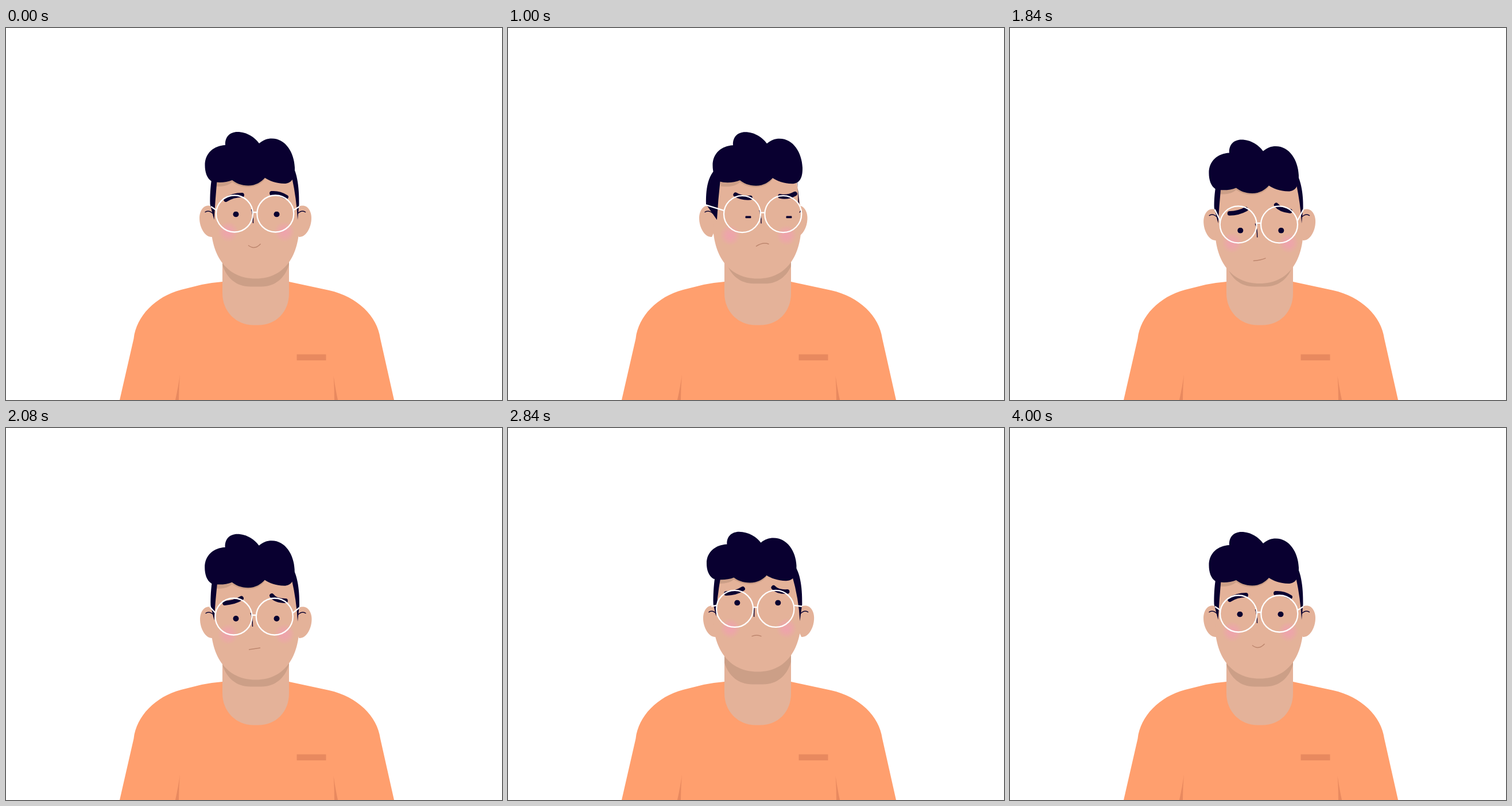
Animation, 864 px wide and 648 px high, one loop 4040 ms. Source, as an HTML page with a canvas:

```html
<!DOCTYPE html>
<html lang="en">
<head>
<meta charset="utf-8">
<title>Portrait</title>
<style>
  html, body { margin: 0; width: 100%; height: 100%; overflow: hidden; background: #fff; }
  canvas { display: block; }
</style>
</head>
<body>
<canvas id="stage" width="864" height="648"></canvas>
<script>
const ctx = document.getElementById('stage').getContext('2d');
const LOOP = 4040, STEP = 40;
const SKIN = '#e4b299', SHADE = '#cc9f87', INK = '#090030', SHIRT = '#ff9f6e', FOLD = '#e8895f';
const LENS = 32, GAP = 71.3, EYE_GAP = 71;

/* hair: x, y, height | ear: left x, right x, y, line lengths | lock: outer x, inner x, inner y, tip
   glasses: lens x, y, arm ends | eyes: x, y, opening | nose and mouth: start, then offsets */
const neutral = {
  hair: [0, 0, 1], jaw: [0], shade: [0, 0], cheek: [355],
  ear: [0, 0, 0, 14, 14],
  lockL: [355.5, 367.5, 266, 362.5, 334], lockR: [510.5, 498, 260, 508, 334],
  glasses: [398, 323.5, 357, 311, 511, 311],
  eyes: [400.5, 324.5, 5], nose: [427.5, 316, 3, 24],
  mouth: [422, 378.5, 11, 9, 21.5, -2.5],
  browL: [383, 299, 395, 291, 411, 291], browR: [463, 288, 476, 287, 488, 294.5]
};
const wary = {
  hair: [10.5, -0.5, 1], jaw: [-0.4], shade: [3, -5.5], cheek: [360.3],
  ear: [-4.2, -11, -0.3, 15, 3],
  lockL: [344.5, 370, 264, 364, 334], lockR: [505, 503, 262, 507.5, 305],
  glasses: [408.5, 323, 344.5, 308, 512, 318],
  eyes: [419.3, 328, 1.8], nose: [438.5, 316, 3, 23],
  mouth: [432.4, 379, 12, -8.5, 22.5, -4],
  browL: [397, 288.5, 406, 295, 422.5, 294.5], browR: [474.5, 292, 488, 294.5, 500.5, 287]
};
const down = {
  ...neutral,
  hair: [0, 15.7, 1], jaw: [10], cheek: [378],
  ear: [0, 0, 7, 14, 14],
  lockL: [355.5, 367, 282, 362.5, 341], lockR: [510.5, 499, 274, 508, 341],
  glasses: [398, 345.5, 357, 317, 511, 317],
  eyes: [401.5, 357.5, 5], nose: [427.5, 345, 3.5, 24],
  mouth: [424, 410, 13, -0.5, 22, -5],
  browL: [383, 327, 398, 327, 411, 320], browR: [464, 312, 471, 321, 488, 323]
};
const rising = {
  ...neutral,
  hair: [-0.3, 3.7, 1], jaw: [2], cheek: [359],
  ear: [1, 0.5, 2, 14, 14],
  lockL: [356.5, 368, 270, 362.5, 335], lockR: [511, 497.5, 263, 508, 337],
  glasses: [396.5, 328.5, 355, 311.5, 511, 313],
  eyes: [400.5, 332, 5], nose: [426, 322, 3.5, 24],
  mouth: [423, 386, 10, -1.5, 20, -3],
  browL: [381, 305, 398, 304, 410, 296.5], browR: [463, 292, 469, 301, 487, 301]
};
const up = {
  hair: [-0.4, -0.3, 0.947], jaw: [-12.5], shade: [0, -3.6], cheek: [347.5],
  ear: [1.8, 0.7, 0, 14, 14],
  lockL: [356.8, 370, 261, 362, 330], lockR: [511.5, 495, 258, 508, 333],
  glasses: [396.8, 314.6, 354, 311, 511, 311],
  eyes: [402, 302.7, 5], nose: [430.6, 313.7, -1, 15],
  mouth: [426, 362, 8.5, -5, 16.5, 0.3],
  browL: [381, 287.5, 398, 287.5, 410, 279.5], browR: [463.6, 278, 471, 286, 487.6, 284.7]
};
const aside = {
  hair: [-1.5, -0.4, 0.972], jaw: [-8.5], shade: [-2, -7], cheek: [360],
  ear: [11.5, 4.5, 0, 8, 11],
  lockL: [364, 371, 263, 364.5, 314], lockR: [518.5, 496, 256, 511.5, 360],
  glasses: [382.3, 317.5, 356, 310, 519, 309],
  eyes: [379.3, 317.5, 5], nose: [417.5, 308, 3.5, 24],
  mouth: [413, 369.5, 11, 7, 21, -2.5],
  browL: [373, 292, 388, 292, 401, 284.5], browR: [454, 278, 462, 286, 478, 287]
};

const inOut = p => p < 0.5 ? 16 * p ** 5 : 1 - 16 * (1 - p) ** 5;
const easeIn = p => p ** 3;
const easeOut = p => 1 - (1 - p) ** 2;
const moves = [
  [0, 440, neutral, wary, inOut],
  [800, 1440, wary, down, inOut],
  [1520, 2080, down, rising, easeIn],
  [2080, 2440, rising, up, easeOut],
  [2600, 3240, up, aside, inOut],
  [3600, 4040, aside, neutral, inOut]
];

function poseAt(time) {
  const [start, end, from, to, ease] = moves.findLast(move => move[0] <= time);
  const k = ease(Math.min(1, (time - start) / (end - start)));
  const pose = {};
  for (const part in from) pose[part] = from[part].map((v, i) => v + (to[part][i] - v) * k);
  return pose;
}

function fill(color, path) {
  ctx.fillStyle = color;
  ctx.fill(new Path2D(path));
}

function stroke(color, width, path, cap = 'butt') {
  ctx.strokeStyle = color;
  ctx.lineWidth = width;
  ctx.lineCap = cap;
  ctx.stroke(new Path2D(path));
}

function shifted(x, y, draw, scaleY = 1, pivot = 0) {
  ctx.save();
  ctx.translate(x, y + pivot);
  ctx.scale(1, scaleY);
  ctx.translate(0, -pivot);
  draw();
  ctx.restore();
}

function drawBody([x, y]) {
  fill(SHIRT, 'M198 648L222.5 541C227 502 260 468 305 456L341 447Q358 443.5 377 442H493L563 457C612 468 647 502 652 541L676 648Z');
  fill(FOLD, 'M506.5 568.5H557.5V579H506.5ZM303 604Q301 620 295 648H301Q301 626 303 604ZM570.5 606Q572 626 572 648H578Q573 624 570.5 606Z');
  const neck = 'M377 380V462C377 495 402 517.5 431 517.5H439C470 517.5 493 495 493 462V380Z';
  fill(SKIN, neck);
  ctx.save();
  ctx.clip(new Path2D(neck));
  shifted(x, y, () => fill(SHADE, 'M370 380L377 412C384 436 402 450.5 425 450.5H445C468 450.5 486 436 493 412L500 380Z'));
  ctx.restore();
}

function drawEars([left, right, y, lineL, lineR], lines) {
  const ear = 'M22 2C8 -4 0 9 0 22C0 39 10 56 22 55L34 30Z';
  if (!lines) {
    shifted(337 + left, 309 + y, () => fill(SKIN, ear));
    shifted(532 + right, 309 + y, () => { ctx.scale(-1, 1); fill(SKIN, ear); });
    return;
  }
  const x1 = 346.5 + left, x2 = 522 + right, top = 321 + y;
  stroke(INK, 1.4, `M${x1} ${top}q${lineL * 0.45} -5 ${lineL} ${lineL * 0.16}`);
  stroke(INK, 1.4, `M${x2} ${top}q${-lineR * 0.45} -5 ${-lineR} ${lineR * 0.16}`);
}

function drawLock([outer, inner, innerY, tipX, tipY], side, rootX, hairY, earY) {
  fill(INK, `M${inner} ${innerY}Q${tipX + side * 2} ${(innerY + tipY) / 2} ${tipX} ${tipY}
    L${outer} ${Math.min(307 + earY, tipY - 4)}
    C${outer - side * 0.5} ${275 + hairY} ${outer + side * 4} ${248 + hairY} ${rootX} ${235 + hairY}Z`);
}

function drawCheek(x, y) {
  const glow = ctx.createRadialGradient(x, y, 0, x, y, 18);
  glow.addColorStop(0, 'rgba(240,160,176,.85)');
  glow.addColorStop(0.45, 'rgba(240,160,176,.6)');
  glow.addColorStop(1, 'rgba(240,160,176,0)');
  ctx.fillStyle = glow;
  ctx.fillRect(x - 18, y - 18, 36, 36);
}

function drawEye(x, y, open) {
  ctx.save();
  ctx.beginPath();
  ctx.rect(x - 6, y - open, 12, open * 2);
  ctx.clip();
  ctx.beginPath();
  ctx.arc(x, y, 5, 0, Math.PI * 2);
  ctx.fillStyle = INK;
  ctx.fill();
  ctx.restore();
}

function drawBrow([x, y, cx, cy, ex, ey]) {
  stroke(INK, 7.8, `M${x} ${y}Q${cx} ${cy} ${ex} ${ey}`, 'round');
}

function drawGlasses([x, y, leftX, leftY, rightX, rightY]) {
  const ring = cx => `M${cx - LENS} ${y}a${LENS} ${LENS} 0 1 1 ${LENS * 2} 0a${LENS} ${LENS} 0 1 1 ${-LENS * 2} 0`;
  const arms = `M${leftX} ${leftY}L${x - 31.4} ${y - 6}M${x + GAP + 31.4} ${y - 6}L${rightX} ${rightY}`;
  stroke('#fff', 2.3, `${ring(x)}${ring(x + GAP)}M${x + LENS} ${y - 2.5}h${GAP - 2 * LENS}${arms}`);
}

function drawHead(p) {
  const [hairX, hairY, hairScale] = p.hair, earY = p.ear[2];
  const onHair = draw => shifted(hairX, hairY, draw, hairScale, 181);
  drawEars(p.ear, false);
  shifted(0, p.jaw[0], () => fill(SKIN,
    'M368 250C364 285 357 310 357 340C357 396 384 436.5 435 436.5C486 436.5 511 396 511 340C511 310 505 285 500 250Z'));
  drawEars(p.ear, true);
  onHair(() => fill(SHADE,
    'M360 262L361 275.5C378 277.5 388 274 394 268.5C402 274 412 277.5 424 277C438 276 447 269 452 262Z'));
  drawLock(p.lockL, 1, 366 + hairX, hairY, earY);
  drawLock(p.lockR, -1, 496 + hairX, hairY, earY);

  drawCheek(387, p.cheek[0]);
  drawCheek(485, p.cheek[0]);
  const [eyeX, eyeY, open] = p.eyes;
  drawEye(eyeX, eyeY, open);
  drawEye(eyeX + EYE_GAP, eyeY, open);
  drawBrow(p.browL);
  drawBrow(p.browR);
  const [nx, ny, nw, nh] = p.nose;
  stroke(INK, 1.4, `M${nx} ${ny}q${nw} ${nh * 0.35} ${nw} ${nh}`);
  const [mx, my, cx, cy, ex, ey] = p.mouth;
  stroke('#bd866e', 1.5, `M${mx} ${my}q${cx} ${cy} ${ex} ${ey}`);

  onHair(() => fill(INK,
    `M382 204C381 190 390 181 403 181C420 181 434 191 441 201C448 195 455 192.5 463 192.5
     C487 192.5 502 217 503 243C503.5 262 497 271 485 271C470 271 458 265.5 451 261
     C445 268 435 274.5 422 274.5C410 274.5 400 270 394 265C383 269.5 368 270 358 267
     C350 262 346.5 251 346.5 239C346.5 218 362 205 382 204Z`));
  drawGlasses(p.glasses);
}

function render(now) {
  const pose = poseAt(Math.floor((now % LOOP) / STEP) * STEP);
  ctx.fillStyle = '#fff';
  ctx.fillRect(0, 0, 864, 648);
  drawBody(pose.shade);
  drawHead(pose);
}

let origin;
function tick(now) {
  origin ??= now;
  render(Math.max(0, now - origin));
  requestAnimationFrame(tick);
}
render(0);
requestAnimationFrame(tick);
</script>
</body>
</html>
```
